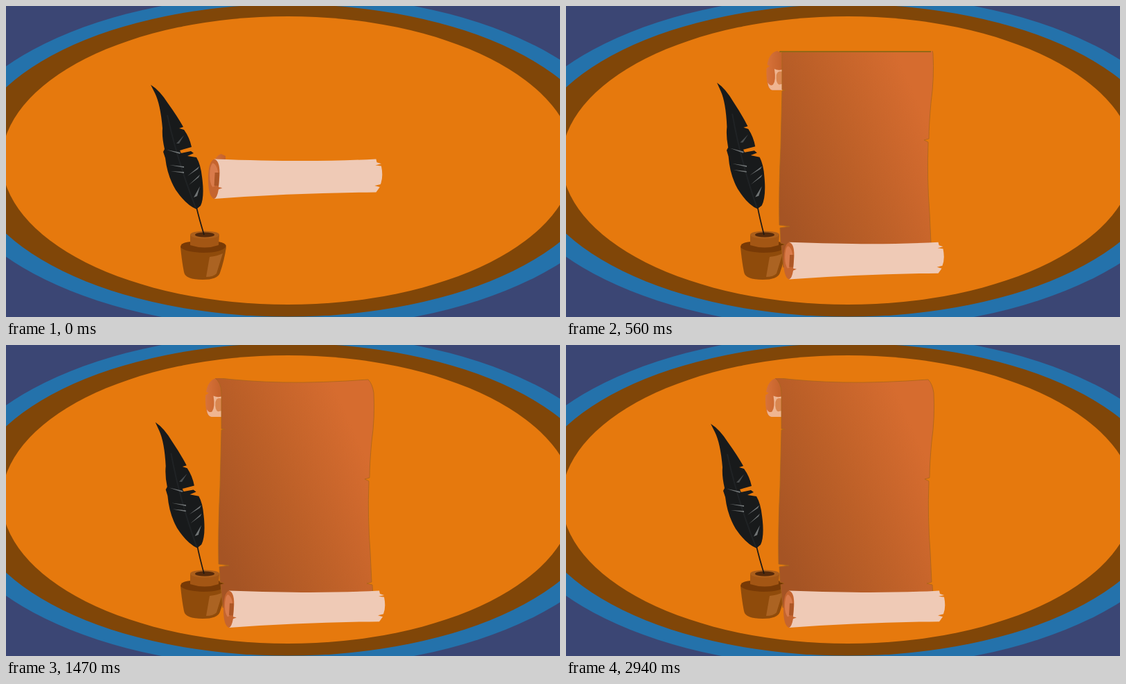
Recreate the animation shown at these times as an HTML page. Size 800 by 450 pixels, loop 3.01 s.

```html
<!DOCTYPE html>
<html lang="en">
<head>
<meta charset="utf-8">
<title>Scroll and quill</title>
<style>
html, body { margin: 0; width: 100%; height: 100%; overflow: hidden; background: #3b4674; }
svg { display: block; width: 100vw; height: 100vh; }
</style>
</head>
<body>
<svg viewBox="0 0 800 450">
  <defs>
    <linearGradient id="paper" gradientUnits="userSpaceOnUse" x1="305" y1="285" x2="530" y2="185">
      <stop offset="0" stop-color="#a55424"/>
      <stop offset=".5" stop-color="#bd6028"/>
      <stop offset="1" stop-color="#d66c2f"/>
    </linearGradient>
    <linearGradient id="curlTone">
      <stop offset="0" stop-color="#d8733a"/>
      <stop offset="1" stop-color="#c4622b"/>
    </linearGradient>
    <clipPath id="reveal"><rect id="window" x="280" width="270"/></clipPath>
  </defs>

  <rect width="800" height="450" fill="#3b4674"/>
  <ellipse cx="407" cy="225" rx="495" ry="242" fill="#2472ab"/>
  <ellipse cx="407" cy="223.5" rx="460.5" ry="226" fill="#804608"/>
  <ellipse cx="407" cy="223.5" rx="413" ry="208.5" fill="#e6790d"/>

  <g id="well">
    <path d="M252 349Q254 370 257 385Q259 396 284 396Q306 396 309 386Q315 369 318 349Z" fill="#8f4b0b"/>
    <path d="M294 363Q305 362 313 358L304 387Q300 392 289 392Z" fill="#ab6322"/>
    <path d="M252 349Q252 342 267 341L307 341Q318 343 318 348Q311 357 285 357Q258 356 252 349Z" fill="#783a06"/>
    <path d="M266 331L308 331L307 346Q287 353 266 346Z" fill="#a35614"/>
    <ellipse cx="287" cy="331" rx="21" ry="5.5" fill="#ad5f1b"/>
    <ellipse cx="287" cy="331" rx="14" ry="3.6" fill="#54290a"/>
  </g>

  <g id="quill">
    <path d="M275 291Q279 308 286 331" fill="none" stroke="#1d1813" stroke-width="1.7"/>
    <path d="M209 114Q222 122 234 141Q247 159 256 175L250 177L257 179Q265 190 268 204L251 209L253 213L267 210L271 213L262 217L275 219
      Q281 229 283 247Q287 276 281 289L275 294Q260 288 245 266Q233 246 230 220L227 211L229 207Q225 190 226 177Q223 142 215 126Z" fill="#181a1b"/>
    <path d="M233 158Q247 223 274 292" fill="none" stroke="#202325" stroke-width="2"/>
    <path d="M232 208L252 212L251 214ZM236 230L257 232L257 234ZM238 239L257 240L257 242ZM262 246L279 232L277 236ZM264 259L280 244L278 248ZM271 277L280 261L276 275Z" fill="#707475"/>
    <path d="M246 199L257 187L250 199Z" fill="#4a4e50"/>
  </g>

  <g id="curl">
    <path d="M303 47Q291 50 288 67L292 69L287 72Q286 104 296 104L311 104L311 50Z" fill="url(#curlTone)"/>
    <path d="M299 73Q305 76 311 74V104H296Q290 103 289 93Q293 99 297 96Q302 90 299 73Z" fill="#efb591"/>
    <path d="M311 77Q304 75 302 82Q301 94 306 96L311 95Z" fill="#d9864f"/>
  </g>

  <g clip-path="url(#reveal)">
    <g id="sheet">
      <path d="M301 47Q349 53 400 54Q455 55 523 50Q529 56 531 69Q533 104 528 140Q525 172 525 192L518 194L524 197
        Q522 250 526 300L528 343L521 345L529 347L531 380L313 380L310 346L315 345L309 343L308 321L322 319L307 317
        Q306 266 309 205L311 123L316 122L311 121L311 70Q311 54 301 47Z" fill="url(#paper)" stroke="#a9651c" stroke-width=".8"/>
      <path d="M307 344L315 345L308 347Z" fill="#733805"/>
    </g>
  </g>
  <path id="hem" fill="none" stroke="#946815" stroke-width="2"/>

  <g id="roll">
    <path d="M322 355.5Q390 358 440 358Q495 358 540 355.5L541 360L547 362L539 364L547 365Q550 380 546 390L538 392L545 394L540 401Q430 402 322 410Z" fill="#efcab6"/>
    <path d="M322 355.5Q331 358 329 382L328 394L333 395L328 397Q326 409 322 410Q314 407 314 383Q314 359 322 355.5Z" fill="#c5652f"/>
    <path d="M320 361Q327 363 328 381Q327 392 320 394Q316 389 316 378Q316 365 320 361Z" fill="#d97b4b"/>
    <path d="M323 374L329 374L328 392L322 392Z" fill="#ad5726"/>
  </g>
</svg>
<script>
const LOOP = 3010, STEP = 70;
const $ = id => document.getElementById(id);

// Each key is [time, ...values]; boxes are left, right, top, bottom.
const swing = [[0, 0], [350, 1.75], [770, 3], [1470, 1.75], [1960, .6], [2590, .45], [2940, 0]];
const rollBox = [[0, 292, 543, 222, 279], [350, 315, 538, 301, 352], [630, 314, 548, 356, 410], [980, 314, 547, 356, 409]];
const curlBox = [[0, 298, 317, 214, 270], [350, 297, 316, 119, 172], [630, 287, 311, 47, 105], [980, 288, 311, 48, 104]];
const sheetBox = [[0, 311, 527, 0, 1], [350, 311, 527, 0, 1], [630, 307, 531, 0, 1]];

function at(keys, t) {
  const i = keys.findIndex(k => k[0] > t);
  if (i < 0) return keys[keys.length - 1].slice(1);
  const a = keys[i - 1], b = keys[i], p = (t - a[0]) / (b[0] - a[0]);
  return a.slice(1).map((v, n) => v + (b[n + 1] - v) * p);
}

function fit(id, from, to) {
  const sx = (to[1] - to[0]) / (from[1] - from[0]);
  const sy = (to[3] - to[2]) / (from[3] - from[2]);
  $(id).setAttribute('transform', `matrix(${sx} 0 0 ${sy} ${to[0] - from[0] * sx} ${to[2] - from[2] * sy})`);
}

function draw(now) {
  const t = Math.floor(now % LOOP / STEP) * STEP;
  const roll = at(rollBox, t), curl = at(curlBox, t);
  const top = Math.max(curl[2], 40), bottom = roll[2] + (t ? 36 : 14);

  $('quill').setAttribute('transform', `rotate(${at(swing, t)[0]} 286 330)`);
  fit('roll', [314, 548, 356, 410], roll);
  fit('curl', [287, 311, 47, 104], curl);
  fit('sheet', [307, 531, 0, 1], at(sheetBox, t));
  $('window').setAttribute('y', t ? top : bottom);
  $('window').setAttribute('height', t ? bottom - top : 0);
  $('hem').setAttribute('d', t && top > 60 ? `M${curl[1] - 4} ${top + 1}H527` : '');
  requestAnimationFrame(draw);
}
requestAnimationFrame(draw);
</script>
</body>
</html>
```
